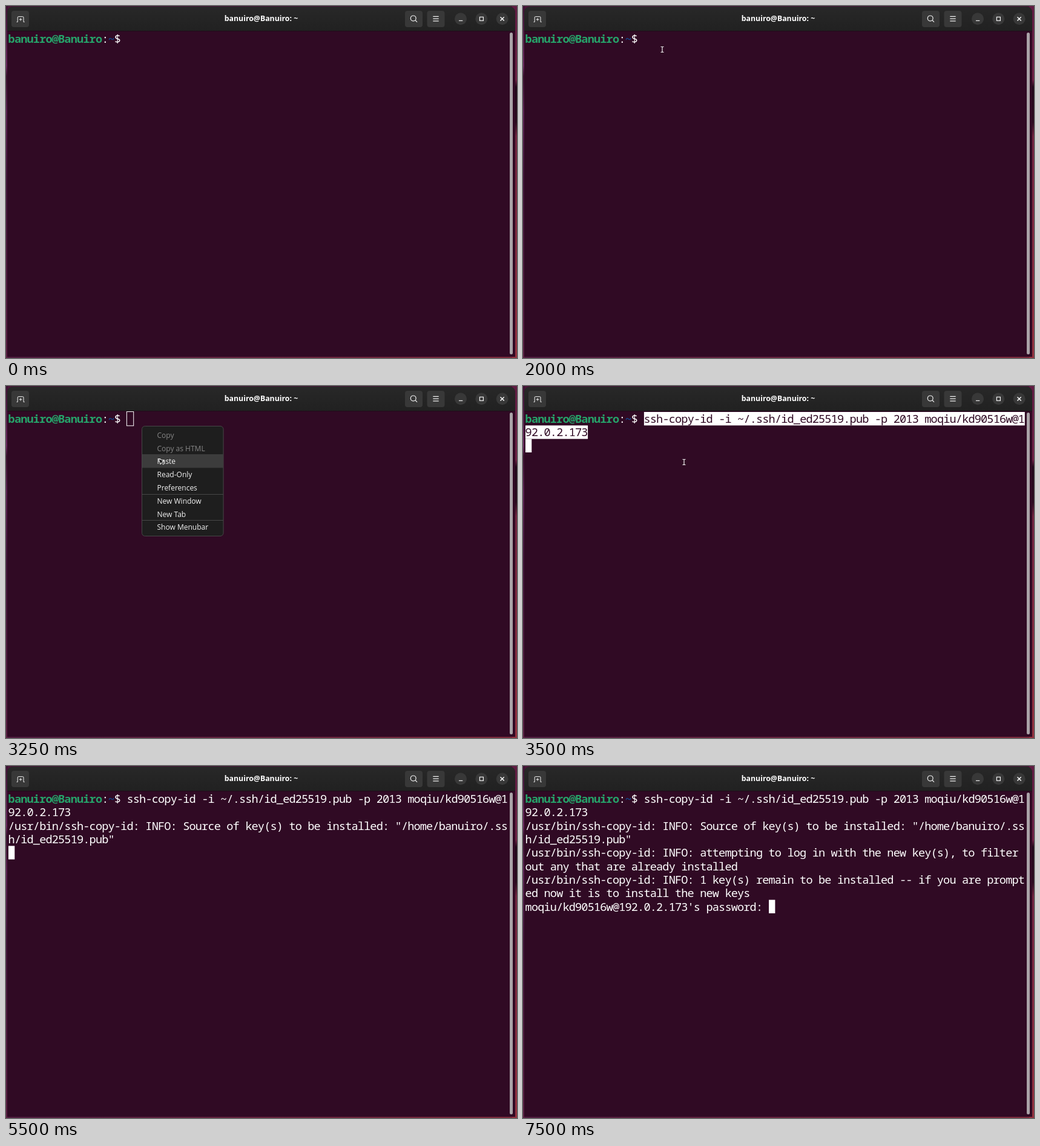
Write an HTML page that moves like this. It is 844 px wide and 583 px high and loops after 8 s.

```html
<!DOCTYPE html>
<html lang="en">
<head>
<meta charset="utf-8">
<title>Terminal</title>
<style>
  html, body { margin: 0; width: 100%; height: 100%; overflow: hidden; background: #300a24; }
  svg { display: block; width: 844px; height: 583px; }
  text { white-space: pre; }
  .mono { font: 18.6px "Noto Sans Mono", "DejaVu Sans Mono", monospace; letter-spacing: -.85px; fill: #fff; }
  .bold { font-weight: 700; }
  .title { font: 700 12.3px "Open Sans", "Noto Sans", sans-serif; fill: #fff; text-anchor: middle; }
  .item { font: 12px "Open Sans", "Noto Sans", sans-serif; fill: #f2f2f2; }
  .off { fill: #858585; }
  .icon { fill: none; stroke: #f2f2f2; stroke-width: 1.2; }
</style>
</head>
<body>
<svg viewBox="0 0 844 583">
  <defs>
    <linearGradient id="left" x2="0" y2="1">
      <stop offset="0" stop-color="#3d1233"/><stop offset=".17" stop-color="#6b2860"/>
      <stop offset=".2" stop-color="#3c1230"/><stop offset=".3" stop-color="#5d2354"/>
      <stop offset=".5" stop-color="#42163a"/><stop offset="1" stop-color="#5b2144"/>
    </linearGradient>
    <linearGradient id="right" x2="0" y2="1">
      <stop offset="0" stop-color="#5f1c42"/><stop offset=".21" stop-color="#6d2144"/>
      <stop offset=".23" stop-color="#22081a"/><stop offset=".33" stop-color="#2a0b1e"/>
      <stop offset=".37" stop-color="#702440"/><stop offset="1" stop-color="#93313f"/>
    </linearGradient>
    <linearGradient id="bottom">
      <stop offset="0" stop-color="#4f1c40"/><stop offset="1" stop-color="#7c2a3c"/>
    </linearGradient>
    <linearGradient id="bar" x2="0" y2="1">
      <stop offset="0" stop-color="#282828"/><stop offset="1" stop-color="#212121"/>
    </linearGradient>
  </defs>

  <rect width="844" height="583" fill="#4a1638"/>
  <rect y="570" width="844" height="13" fill="url(#bottom)"/>
  <rect width="3" height="583" fill="url(#left)"/>
  <rect x="836" width="8" height="583" fill="url(#right)"/>
  <path d="M2 581V12Q2 1 13 1H830Q841 1 841 12V581Z" fill="#300a24"/>
  <path d="M2 41V12Q2 1 13 1H830Q841 1 841 12V41Z" fill="url(#bar)"/>
  <path d="M2 41.5H841" stroke="#1f0c1a"/>
  <rect x="832" y="44" width="5" height="533" rx="2.5" fill="#aaa3a8"/>

  <g fill="#383838">
    <rect x="9" y="8" width="29" height="27" rx="4"/>
    <rect x="659" y="8" width="29" height="27" rx="4"/>
    <rect x="695.5" y="8" width="29" height="27" rx="4"/>
    <circle cx="751" cy="21.3" r="10"/>
    <circle cx="785.3" cy="21.3" r="10"/>
    <circle cx="819.7" cy="21.3" r="10"/>
  </g>
  <g class="icon">
    <path d="M17.6 26.4H19.2V19Q19.2 17.6 20.6 17.6H27.6Q29 17.6 29 19V26.4H30.6M24.1 20V24.6M21.8 22.3H26.4" stroke-width="1"/>
    <circle cx="672.7" cy="20.4" r="4.4"/><path d="M676 23.7L679 26.7"/>
    <path d="M705.3 17.3H714.7M705.3 21.1H714.7M705.3 24.9H714.7"/>
    <path d="M748 24.3H754.3"/>
    <rect x="782.4" y="18.3" width="6" height="6"/>
    <path d="M816.5 18.2L822.7 24.4M822.7 18.2L816.5 24.4" stroke-width="1.5"/>
  </g>
  <text class="title" x="421.5" y="25.4">banuiro@Banuiro: ~</text>

  <g id="selection" fill="#fff"></g>
  <g id="screen"></g>
  <rect id="caret"/>
  <g id="menu">
    <rect x="224.5" y="66.5" width="134.5" height="182" rx="5" fill="#1e1e1e" stroke="#474747"/>
    <rect id="hover" x="225" y="113" width="134" height="22.5" fill="#3c3c3c"/>
    <path d="M225 179.5H359M225 222.5H359" stroke="#474747"/>
  </g>
  <path id="beam" d="M-2.5 -4.5H-.8L0 -3.8L.8 -4.5H2.5M0 -3.8V3.8M-2.5 4.5H-.8L0 3.8L.8 4.5H2.5"
        fill="none" stroke="#eee" stroke-width="1.2"/>
  <path id="arrow" d="M0 0L9 3.4L5.8 5L9.2 8.4L7.8 9.8L4.5 6.4L3 9.4Z" fill="#1c1c1c" stroke="#eee"/>
</svg>

<script>
const LOOP = 8000, COLS = 80, LEFT = 4, TOP = 43, CELL = 10.31, ROW = 22.33;
const HOST = "banuiro@Banuiro", PROMPT = HOST + ":~$ ";
const LOGIN = "moqiu/kd90516w@192.0.2.173";
const INFO = "/usr/bin/ssh-copy-id: INFO: ";
const $ = id => document.getElementById(id);

function add(parent, tag, attrs, content = "") {
  const node = document.createElementNS("http://www.w3.org/2000/svg", tag);
  set(node, attrs);
  node.textContent = content;
  return parent.appendChild(node);
}
function set(node, attrs) {
  for (const key in attrs) node.setAttribute(key, attrs[key]);
}
const show = (node, on) => set(node, { visibility: on ? "visible" : "hidden" });
const colX = col => LEFT + col * CELL;
const rowY = row => TOP + row * ROW;
const wrap = line => line.match(new RegExp(`.{1,${COLS}}`, "g"));

// Each output chunk: when it appears, then its text.
const output = [
  [3500, `${PROMPT}ssh-copy-id -i ~/.ssh/id_ed25519.pub -p 2013 ${LOGIN}`],
  [5500, `${INFO}Source of key(s) to be installed: "/home/banuiro/.ssh/id_ed25519.pub"`],
  [5750, `${INFO}attempting to log in with the new key(s), to filter out any that are already installed`],
  [5750, `${INFO}1 key(s) remain to be installed -- if you are prompted now it is to install the new keys`],
  [6000, `${LOGIN}'s password: `]
];

const screen = $("screen");
function write(row, col, text, fill = "#fff", weight = "") {
  const attrs = { class: "mono " + weight, x: colX(col) - .4, y: rowY(row) + 18, style: `fill:${fill}` };
  return add(screen, "text", attrs, text);
}
write(0, 0, HOST, "#26a269", "bold");
write(0, HOST.length, ":");
write(0, HOST.length + 1, "~", "#12488b", "bold");
write(0, HOST.length + 2, "$");

let nextRow = 0;
const lines = output.flatMap(([at, text]) => wrap(text).map(part => {
  const row = nextRow++, col = row ? 0 : PROMPT.length;
  return { at, row, col, end: part.length, node: write(row, col, part.slice(col)) };
}));
const command = lines.slice(0, 2);
for (const { row, col, end } of command)
  add($("selection"), "rect", { x: colX(col), y: rowY(row), width: (end - col) * CELL, height: ROW });

["Copy", "Copy as HTML", "Paste", "Read-Only", "Preferences", "New Window", "New Tab", "Show Menubar"]
  .forEach((label, i) => add($("menu"), "text", { class: i < 2 ? "item off" : "item", x: 249.5, y: 85.8 + i * 21.8 }, label));

// Steps are [time, ...values]; each holds until the next.
const pointer = [
  [0], [250, "beam", 423, 464], [500, "beam", 438, 390], [750, "beam", 422, 367],
  [1500, "beam", 298, 175], [1750, "beam", 236, 84.5], [2000, "beam", 230, 72],
  [2250, "arrow", 226, 68], [2750, "arrow", 245, 107], [3000, "arrow", 261, 121], [3250, "arrow", 252, 120.5],
  [3500, "beam", 266, 126], [3750, "beam", 256, 129], [4000, "beam", 200, 104],
  [4250, "beam", 200, 91], [4750, "beam", 200, 96], [5250]
];
const caret = [
  [0], [250, "solid", 0, 19], [750], [1500, "solid", 0, 19], [2000], [2250, "hollow", 0, 19],
  [3500, "solid", 2, 0], [4000], [4500, "solid", 2, 0], [5500, "solid", 4, 0],
  [5750, "solid", 8, 0], [6000], [6500, "solid", 8, 39]
];
const current = (steps, t) => steps.findLast(step => step[0] <= t).slice(1);

function render(t) {
  const selected = t >= 3500 && t < 5500;
  show($("selection"), selected);
  for (const line of lines) show(line.node, t >= line.at);
  for (const line of command) line.node.style.fill = selected ? "#300a24" : "#fff";

  const [style, row, col] = current(caret, t), box = $("caret");
  show(box, style);
  if (style) {
    const hollow = style === "hollow", grow = hollow ? .5 : 0;
    set(box, {
      x: colX(col) - grow, y: rowY(row) - grow,
      width: CELL + grow * 2, height: ROW + grow * 2,
      fill: hollow ? "none" : "#fff", stroke: hollow ? "#fff" : "none"
    });
  }

  const menuOpen = t >= 2250 && t < 3500;
  show($("menu"), menuOpen);
  show($("hover"), menuOpen && t >= 3000);
  for (const label of $("menu").querySelectorAll("text")) show(label, menuOpen);

  const [shape, x, y] = current(pointer, t);
  for (const id of ["beam", "arrow"]) {
    show($(id), id === shape);
    if (id === shape) set($(id), { transform: `translate(${x} ${y})` });
  }
}

const start = performance.now();
function tick() {
  render((performance.now() - start) % LOOP);
  requestAnimationFrame(tick);
}
tick();
</script>
</body>
</html>
```
